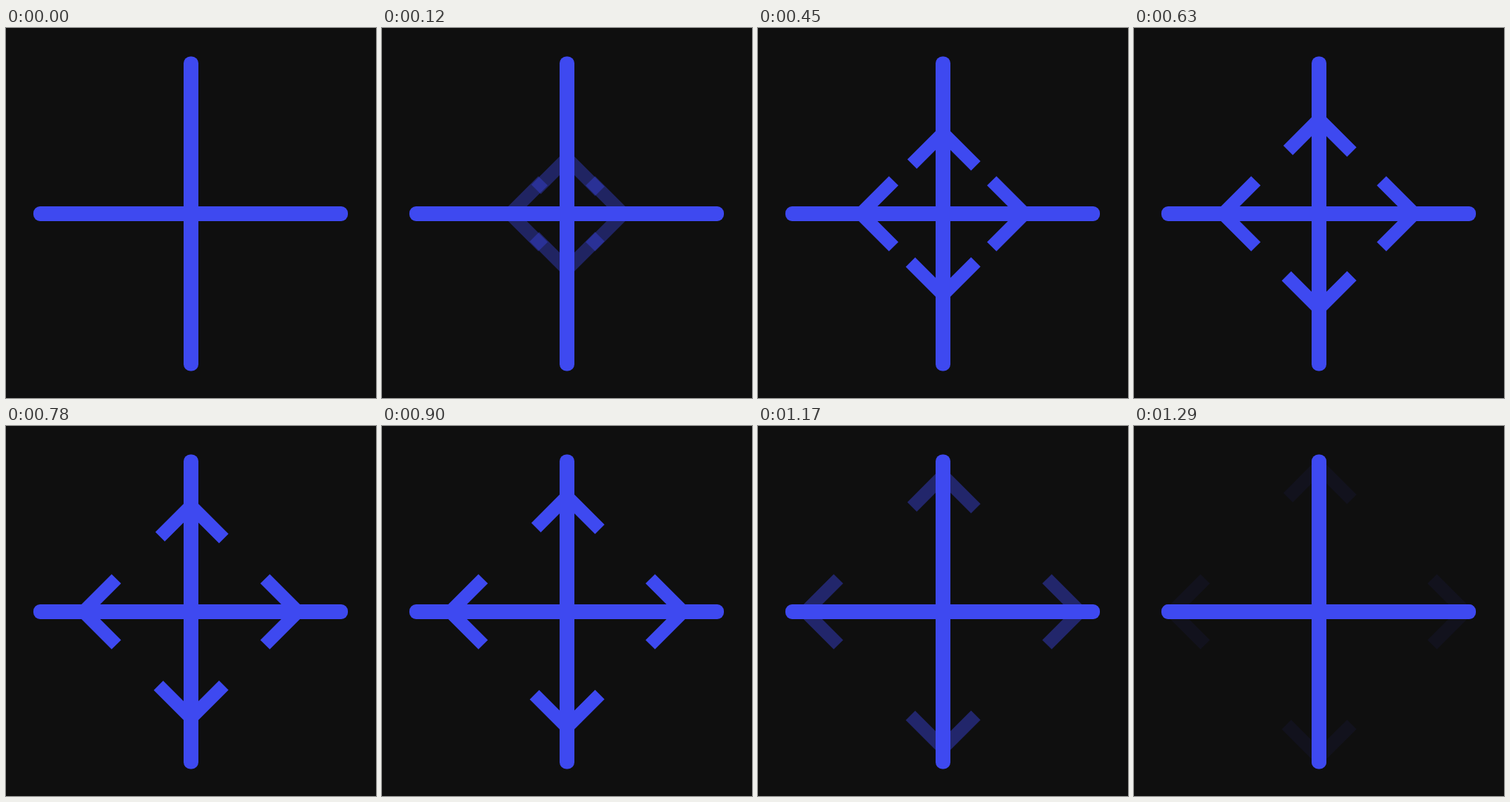
Write an HTML page that moves like this. It is 500 px wide and 500 px high and loops after 1.32 s.

```html
<!DOCTYPE html>
<html>
<head>
<meta charset="utf-8">
<style>
  html, body { margin: 0; height: 100%; overflow: hidden; background: #0f0f0f; }
  svg { display: block; width: 100vw; height: 100vh; }
  rect { fill: #3e49f0; }
  path { fill: none; stroke: #3e49f0; stroke-width: 18; stroke-linejoin: bevel; }
</style>
</head>
<body>
<svg viewBox="0 0 500 500">
  <!-- Chevrons at their starting positions around the centre -->
  <path data-dir="1,0" d="M269.2 206.5L313.7 251L269.2 295.5"/>
  <path data-dir="-1,0" d="M230 206.5L185.5 251L230 295.5"/>
  <path data-dir="0,-1" d="M208.2 230.6L250 188.7L294.3 233"/>
  <path data-dir="0,1" d="M206 269.7L250 313.7L294.3 269.5"/>
  <rect x="37" y="241" width="425" height="20" rx="9"/>
  <rect x="240" y="38.5" width="20" height="425" rx="9"/>
</svg>
<script>
  const LOOP = 1320, STEP = 30, SPEED = 0.1037;
  const arrows = [...document.querySelectorAll('path')].map(el => ({
    el, dir: el.dataset.dir.split(',').map(Number)
  }));
  const clamp = v => Math.max(0, Math.min(1, v));

  function draw(now) {
    const t = Math.floor((now % LOOP) / STEP) * STEP;
    const opacity = clamp(Math.min(t / 330, (1311 - t) / 345));
    for (const { el, dir: [x, y] } of arrows) {
      el.setAttribute('transform', `translate(${x * SPEED * t} ${y * SPEED * t})`);
      el.setAttribute('opacity', opacity);
    }
  }

  const start = performance.now();
  function tick() {
    draw(performance.now() - start);
    requestAnimationFrame(tick);
  }
  tick();
</script>
</body>
</html>
```
